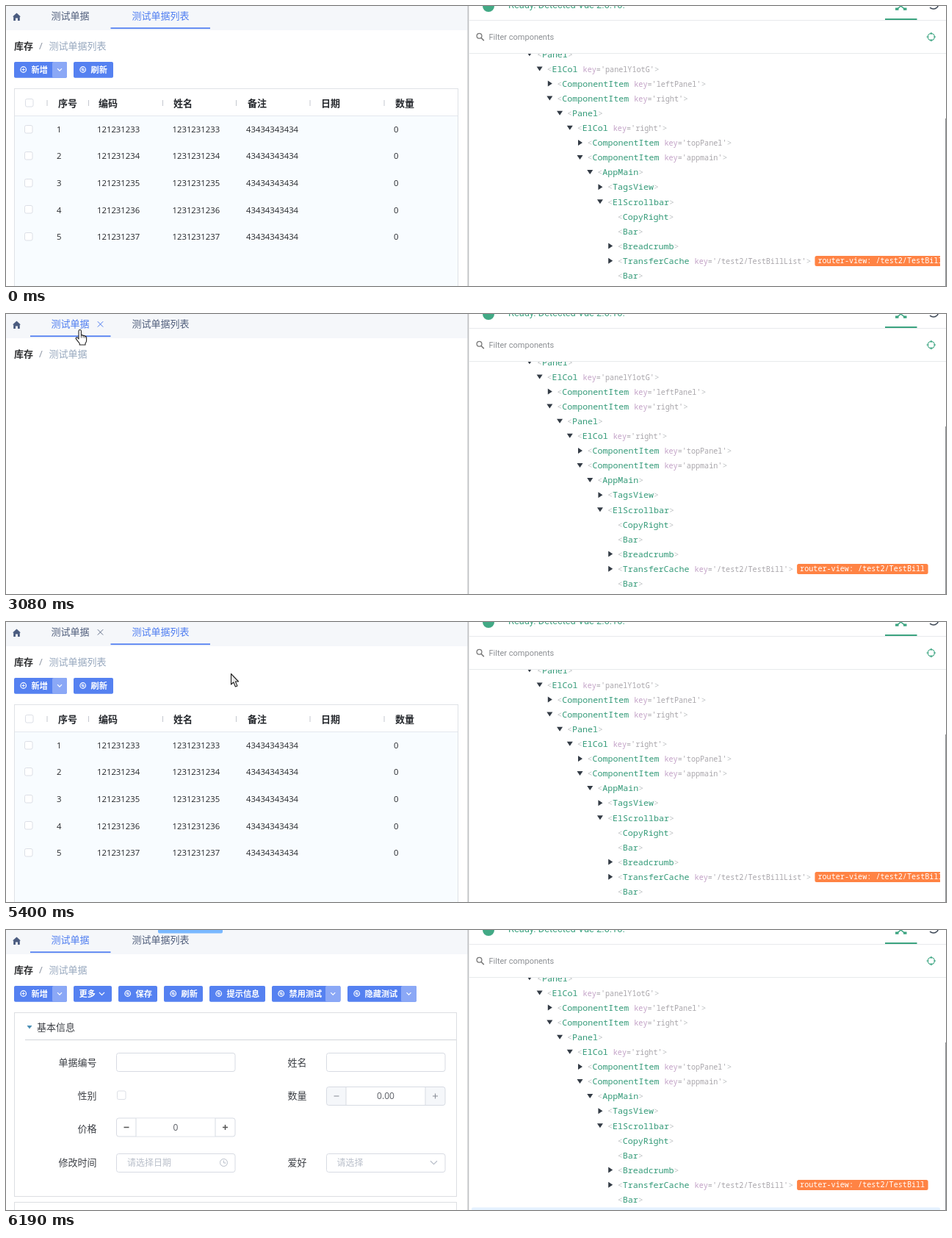
These frames come from a looping animation (1280x381 px, 6.65 s). An HTML page:

```html
<!DOCTYPE html>
<html lang="zh-CN">
<head>
<meta charset="utf-8">
<title>Tab cache demo</title>
<style>
  html, body { margin: 0; width: 100%; height: 100%; overflow: hidden; background: #fff; }
  svg { display: block; width: 100%; height: 100%; }
  text { font-family: "Open Sans", "Noto Sans CJK SC", "Noto Sans CJK", sans-serif; }
  .ui { font-family: Roboto, sans-serif; }
  .mono, .mono tspan { font-family: "Noto Sans Mono", monospace; }
</style>
</head>
<body>
<svg viewBox="0 0 1280 381">
  <g id="scene"></g>
  <g id="cursor" stroke="#222" stroke-width="1.1" stroke-linejoin="round">
    <path id="arrow" fill="#e8e8e8" d="M.5 .5V15L3.8 12 6.4 18 9 16.9 6.4 11H10.6Z"/>
    <g id="hand" transform="translate(0 1)">
      <path fill="#fff" d="M5 2.2a1.7 1.7 0 0 1 3.4 0V8q1.6-1 2.7.6 1.7-.8 2.5.8 2-.4 2 1.6v4q0 2.5-1.6 4V21H6.2v-2Q4.5 17 1.2 12.6q-.4-1.8 1.4-1.8 1.2.3 2.4 2.2z"/>
      <path fill="none" stroke-width=".8" d="M8.4 8v3.5M11.1 8.6v3M13.6 9.4v2.4"/>
    </g>
  </g>
</svg>
<script>
const LOOP = 6650;
const BLUE = '#5581f1', PALE = '#8ba8f6', GREEN = '#3ba480', LEAF = '#339a78', INK = '#303133';
const $ = id => document.getElementById(id);

// ---- drawing helpers ----
const rect = (x, y, w, h, fill, more = '') =>
  `<rect x="${x}" y="${y}" width="${w}" height="${h}" fill="${fill}" ${more}/>`;
const frame = (x, y, w, h, r = 0, color = '#d7dbe3', fill = '#fff') =>
  rect(x, y, w, h, fill, `rx="${r}" stroke="${color}"`);
const line = (d, color, w = 1) =>
  `<path d="${d}" fill="none" stroke="${color}" stroke-width="${w}"/>`;
const circle = (x, y, r, color, w = 1) =>
  `<circle cx="${x}" cy="${y}" r="${r}" fill="none" stroke="${color}" stroke-width="${w}"/>`;
const fillPath = (d, color) => `<path d="${d}" fill="${color}"/>`;
// y is the vertical middle of the glyphs
const text = (x, y, s, size, color, more = '') =>
  `<text x="${x}" y="${y + size * 0.36}" font-size="${size}" fill="${color}" ${more}>${s}</text>`;
const bold = 'font-weight="700"';
const chevron = (x, y, r, color, w = 1.2) =>
  line(`M${x - r} ${y - r / 2}l${r} ${r} ${r} ${-r}`, color, w);

// ---- left side ----
const TABS = [
  { name: '测试单据', x: 61.5, from: 33, to: 142.5, close: 128.5 },
  { name: '测试单据列表', x: 171.5, from: 142.5, to: 278, close: 264 }
];

function tabBar(s) {
  let out = rect(0, 0, 629, 33, '#f5f7fa') +
    fillPath('M14.5 9.5 20 14.5H18.8V20H16V16.6H13V20H10.2V14.5H9Z', '#4b5c80');
  TABS.forEach((tab, i) => {
    const on = s.tab === i + 1;
    if (on) out += rect(tab.from, 29.3, tab.to - tab.from, 1.8, BLUE);
    out += text(tab.x, 13.8, tab.name, 13, on ? '#4d7cf0' : '#4f5d7b');
    if (s.close === i + 1)
      out += line(`M${tab.close - 3.7} 10.2l7.4 7.4m0-7.4l-7.4 7.4`, on ? '#4d7cf0' : '#65728c');
  });
  return out +
    text(11, 54, '库存', 13, INK, 'font-weight="600"') +
    text(45, 54, '/', 13, '#8d95a3') +
    text(58.5, 54, TABS[s.tab - 1].name, 13, '#97a8be');
}

function button(x, w, label, icon, split) {
  const end = x + w, total = w + (split || 0);
  let out = rect(x, 76, total, 21.7, BLUE, 'rx="2"');
  if (split) out += rect(end, 76, split, 21.7, PALE, 'rx="2"') + chevron(end + split / 2, 86.7, 3, '#fff');
  if (icon) out += circle(x + 12.7, 86.5, 3.8, '#fff', 1.2);
  if (icon === 'plus') out += line(`M${x + 10.7} 86.5h4m-2-2v4`, '#fff');
  if (icon === 'ring') out += circle(x + 12.7, 86.5, 1.5, '#fff') + line(`M${x + 10.5} 84.3l4.4 4.4`, '#fff');
  return out + text(x + (icon ? 23.5 : 7.5), 86.7, label, 11.2, '#fff', 'font-weight="600"');
}

const checkbox = (x, y, size, fill) => frame(x, y, size, size, 2, '#dcdfe6', fill);

function listPage(s) {
  const heads = ['序号', '编码', '姓名', '备注', '日期', '数量'];
  const headX = [71, 126, 228, 329, 429, 530];
  const tickX = [56, 112.5, 213.5, 313.5, 414, 515];
  let out = button(11, 52, '新增', 'plus', 20) + button(92, 54, '刷新', 'ring') +
    frame(11.5, 112.5, 604, 290, 0, '#dfe2e6') +
    rect(12, 150, 603, 231, '#f8fcff') + line('M12 149.5H615', '#e4e8ee') +
    checkbox(26.5, 126.5, 10.5, s.rows ? '#fff' : '#edf2fc');
  heads.forEach((h, i) => {
    out += line(`M${tickX[i]} 128v8`, '#c4c8cf') + text(headX[i], 132, h, 13, '#25282d', bold);
  });
  for (let i = 0; s.rows && i < 5; i++) {
    const y = 167.8 + i * 36.55;
    const cell = (x, v) => text(x, y, v, 11.3, '#25272b');
    out += checkbox(25.5, Math.round(y) - 5.5, 10.5, '#fff') + cell(69, i + 1) +
      cell(124, 121231233 + i) + cell(226.5, 1231231233 + i) +
      cell(327, '43434343434') + cell(528, 0);
  }
  return out;
}

function stepper(x, y, value, side, sign) {
  const mid = y + 12.5;
  return frame(x, y, 161.5, 25, 3, '#d7dbe3', side) +
    rect(x + 26.5, y + .5, 108, 24, '#fff') +
    line(`M${x + 26.5} ${y}v25M${x + 134.5} ${y}v25`, '#d7dbe3') +
    line(`M${x + 10} ${mid}h7M${x + 144.5} ${mid}h7m-3.5-3.5v7`, sign, sign === '#555' ? 1.5 : 1) +
    text(x + 80.5, mid, value, 12, '#5b5e65', 'text-anchor="middle"');
}

function formPage(s) {
  const L = 150.5, R = 436.5, HINT = '#b9bfca';
  const label = (x, y, v) => text(x, y, v, 13, '#3c3f45', 'text-anchor="end"');
  const input = (x, y) => frame(x, y, 161.5, 25, 3);
  return button(11, 52, '新增', 'plus', 20) + button(92, 52, '更多') + chevron(130.5, 86.7, 3.6, '#fff') +
    button(153, 53, '保存', 'ring') + button(215, 53, '刷新', 'ring') +
    button(277, 76, '提示信息', 'ring') + button(362, 73, '禁用测试', 'ring', 20.5) +
    button(465, 73, '隐藏测试', 'ring', 21) +
    frame(11.5, 112.5, 602, 250, 0, '#dcdee2') + frame(11.5, 370.5, 602, 40, 0, '#dcdee2') +
    fillPath('M28.5 130h7l-3.5 4.5z', '#4a8fb5') + text(42, 132, '基本信息', 13, '#3c3f45') +
    line('M26 149.5H613', '#d2d5da') +
    label(123.5, 180, '单据编号') + input(L, 167.5) + label(409.5, 180, '姓名') + input(R, 167.5) +
    label(123.5, 225, '性别') + checkbox(151.5, 219, 11.5, '#fff') +
    label(409.5, 225, '数量') + stepper(R, 213.5, '0.00', '#f5f7fa', '#858a94') +
    label(123.5, 270.5, '价格') + stepper(L, 256, s.price, '#fff', '#555') +
    label(123.5, 316.5, '修改时间') + input(L, 304.5) + text(165, 316.5, '请选择日期', 12, HINT) +
    circle(296.5, 316.5, 5, HINT) + line('M296.5 313.5v3.5h3', HINT) +
    label(409.5, 316.5, '爱好') + input(R, 304.5) + text(450.5, 316.5, '请选择', 12, HINT) +
    chevron(582.5, 316.5, 4.5, HINT);
}

// ---- right side ----
const TREE = [ // level, name, key, arrow
  [0, 'Panel', '', 'open'], [1, 'ElCol', 'panelY1otG', 'open'],
  [2, 'ComponentItem', 'leftPanel', 'shut'], [2, 'ComponentItem', 'right', 'open'],
  [3, 'Panel', '', 'open'], [4, 'ElCol', 'right', 'open'],
  [5, 'ComponentItem', 'topPanel', 'shut'], [5, 'ComponentItem', 'appmain', 'open'],
  [6, 'AppMain', '', 'open'], [7, 'TagsView', '', 'shut'], [7, 'ElScrollbar', '', 'open'],
  [8, 'CopyRight'], [8, 'Bar'], [8, 'Breadcrumb', '', 'shut'],
  [8, 'TransferCache', 'route', 'shut'], [8, 'Bar']
];
const NAME_SIZE = 11.67, KEY_SIZE = 10.15, CHAR = 0.6;

function treeRow([level, name, key, arrow], i, route) {
  const x = 712.9 + level * 13.72, y = 65.3 + i * 20.1;
  const isRoute = key === 'route';
  const value = isRoute ? route : key;
  let out = '';
  if (arrow === 'open') out += fillPath(`M${x - 4} ${y - 3}h8l-4 6z`, '#333b45');
  if (arrow === 'shut') out += fillPath(`M${x - 2.5} ${y - 4}v8l6-4z`, '#333b45');
  const attr = value ? ` <tspan font-size="${KEY_SIZE}"><tspan fill="#c2a0c6">key</tspan>` +
    `<tspan fill="#a9a6ab">='${value}'</tspan></tspan>` : '';
  out += text(x + 10, y, `&lt;<tspan fill="${LEAF}">${name}</tspan>${attr}&gt;`, NAME_SIZE, '#c0c3c5', 'class="mono"');
  if (isRoute) {
    const tag = 'router-view: ' + route;
    const tx = x + 10 + (name.length + 3) * NAME_SIZE * CHAR + (value.length + 6) * KEY_SIZE * CHAR + 4.5;
    out += rect(tx, 340, tag.length * KEY_SIZE * CHAR + 8, 14, '#ff8344', 'rx="2.5"') +
      text(tx + 4, y, tag, KEY_SIZE, '#fff', 'class="mono"');
  }
  return out;
}

function hoverRow(i) {
  const y = 65.8 + i * 20.1;
  return rect(634, y - 10, 638, 20, '#e5f2ff', 'rx="2"') +
    fillPath(`M1252.5 ${y}q6.5-9 13 0q-6.5 9-13 0z`, '#8a9f8e') +
    `<circle cx="1259" cy="${y}" r="2.6" fill="#e5f2ff"/><circle cx="1259" cy="${y}" r="1.4" fill="#8a9f8e"/>`;
}

function devPanel(s) {
  const rows = TREE.map((row, i) => treeRow(row, i, '/test2/' + s.route)).join('');
  return rect(628.5, 0, 1.8, 381, '#bfc1c4') +
    `<circle cx="657" cy="0" r="8" fill="#42a985"/>` +
    text(684, -1.8, 'Ready. Detected Vue 2.6.10.', 12.8, GREEN, 'class="ui"') +
    line('M1213 4.5l5.5-4.5 5.5 4.5', GREEN, 1.6) +
    rect(1211, 2.5, 4.5, 3.2, GREEN) + rect(1222, 2.5, 4.5, 3.2, GREEN) +
    line('M1258 2.2q5.5 4 10-.5q1.5-1.7 1.5-4', '#3d4856', 1.5) +
    line('M630 19.5H1280', '#e8eaec') + rect(1197, 17, 43.5, 2, GREEN) +
    circle(644.5, 40.8, 3.4, '#777', 1.3) + line('M647 43.3l3.8 3.8', '#777', 1.5) +
    text(657.5, 41.8, 'Filter components', 11, '#8c8f93', 'class="ui"') +
    circle(1259.8, 42, 4.6, GREEN, 1.1) +
    line('M1259.8 35.7v3m0 6.6v3M1253.5 42h3m6.6 0h3', GREEN, 1.2) +
    line('M630 64.5H1280', '#e8eaec') +
    `<clipPath id="view"><rect x="630" y="65" width="642" height="316"/></clipPath>` +
    `<g clip-path="url(#view)">${s.hover ? hoverRow(s.hover) : ''}${rows}</g>` +
    rect(1279, 153, 1, 228, '#8f9194');
}

// ---- timeline ----
const CHANGES = [
  [0, { tab: 2, close: 0, page: 'list', rows: true, price: '', route: 'TestBillList', hover: 0, toast: false }],
  [1370, { close: 1 }],
  [3010, { tab: 1, page: '' }],
  [3080, { route: 'TestBill' }],
  [3390, { page: 'form' }],
  [3470, { close: 0 }],
  [3550, { close: 2 }],
  [3850, { price: '0' }],
  [4160, { tab: 2 }],
  [4230, { page: '' }],
  [4390, { route: 'TestBillList' }],
  [4710, { page: 'list', rows: false }],
  [4860, { rows: true }],
  [4940, { close: 1 }],
  [5560, { tab: 1, page: '', price: '' }],
  [5710, { hover: 11 }],
  [5870, { page: 'form' }],
  [5950, { close: 0 }],
  [6020, { route: 'TestBill', hover: 16 }],
  [6100, { price: '0' }],
  [6190, { toast: true }]
];

const MOVES = [ // start, end, from x, y, to x, y
  [510, 900, 428, 265, 74, 9],
  [1370, 1520, 74, 9, 76, 8],
  [2380, 2460, 91, 18, 94, 20],
  [3390, 3700, 110, 19, 196, 17],
  [4710, 4780, 180, 16, 161, 16],
  [4860, 5180, 150, 15, 86, 10],
  [5320, 5400, 150, 30, 306, 70],
  [5480, 5790, 470, 125, 1128, 344],
  [5870, 5950, 1180, 368, 1230, 400]
];
const TICK = 78;

function drawCursor(t) {
  const move = MOVES.filter(m => m[0] <= t).pop();
  $('cursor').style.display = move ? '' : 'none';
  if (!move) return;
  const [t0, t1, x0, y0, x1, y1] = move;
  const n = Math.round((t1 - t0) / TICK);
  const p = Math.min(n, Math.floor((t - t0) * n / (t1 - t0))) / n;
  const x = Math.round(x0 + (x1 - x0) * p), y = Math.round(y0 + (y1 - y0) * p);
  const pointing = (x < 278 && y < 33) || (x > 634 && y > 65);
  $('hand').style.display = pointing ? '' : 'none';
  $('arrow').style.display = pointing ? 'none' : '';
  $('cursor').setAttribute('transform', `translate(${x} ${y})`);
}

const PAGES = { list: listPage, form: formPage, '': () => '' };
let shown = -1;

function drawScene(t) {
  const past = CHANGES.filter(c => c[0] <= t);
  if (past.length === shown) return;
  shown = past.length;
  const s = Object.assign({}, ...past.map(c => c[1]));
  $('scene').innerHTML = rect(0, 0, 1280, 381, '#fff') + tabBar(s) + PAGES[s.page](s) + devPanel(s) +
    (s.toast ? rect(207, -16, 88, 20.5, '#79b8ff', 'rx="2"') : '');
}

const start = performance.now();
function tick() {
  const t = (performance.now() - start) % LOOP;
  drawScene(t);
  drawCursor(t);
  requestAnimationFrame(tick);
}
tick();
</script>
</body>
</html>
```
